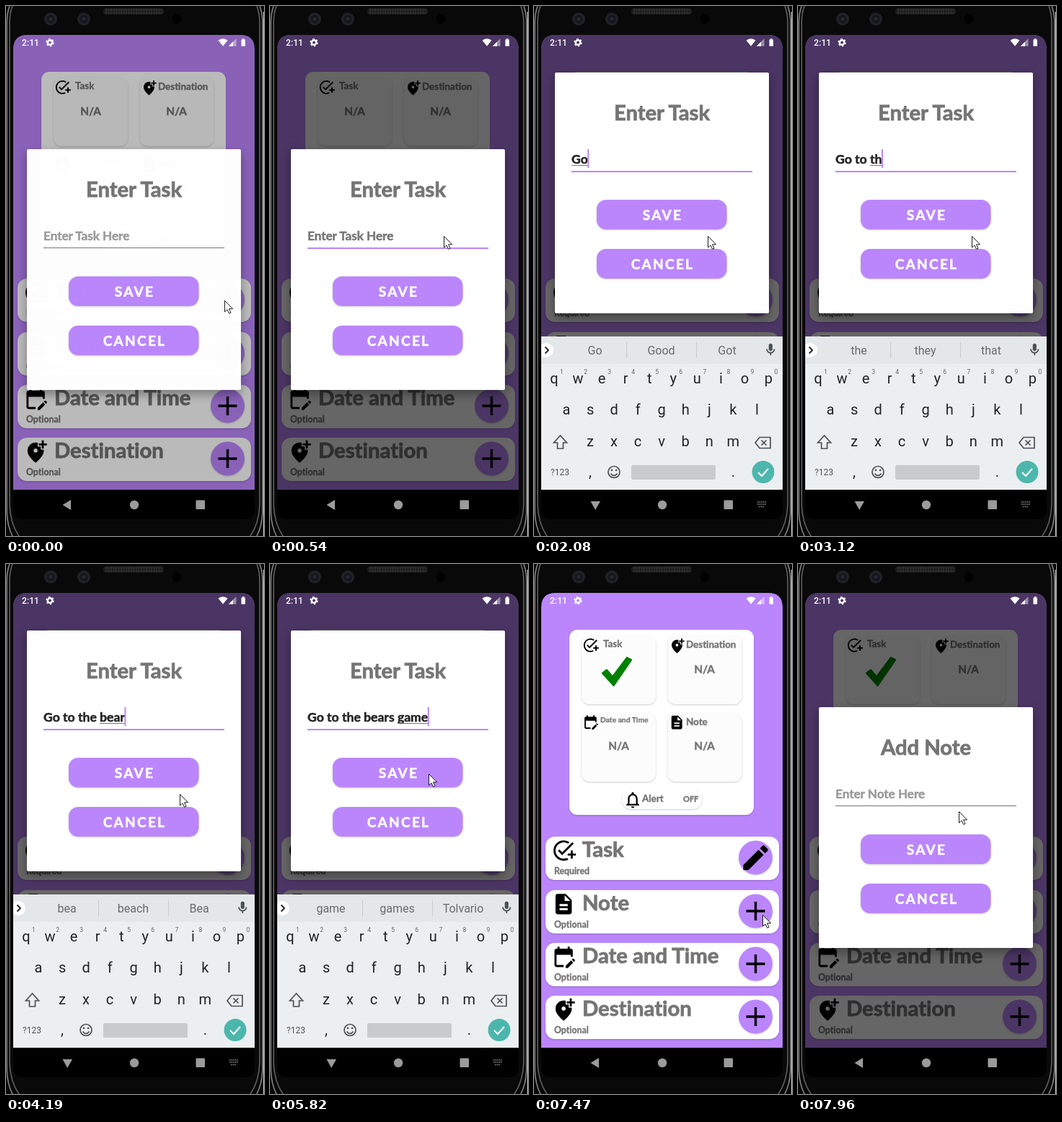
Recreate the animation shown at these times as an HTML page. Size 358 by 733 pixels, loop 8 s.

```html
<!DOCTYPE html>
<html lang="en">
<head>
<meta charset="utf-8">
<title>Task planner</title>
<style>
html, body { margin: 0; width: 100%; height: 100%; overflow: hidden; background: #000; }
svg { display: block; width: 358px; height: 733px; font-family: Lato, "Open Sans", sans-serif; font-weight: 700; }
text { fill: currentColor; stroke: currentColor; stroke-width: .028em; font-variant-ligatures: none; }
.robo { font-family: Roboto, sans-serif; font-weight: 400; }
.robo text, text.robo { stroke: none; }
.mid { text-anchor: middle; }
.lift { filter: drop-shadow(0 1px 1px rgba(0,0,0,.2)); }
.float { filter: drop-shadow(0 6px 7px rgba(0,0,0,.35)); }
.line { fill: none; stroke: #4a5053; stroke-width: 1.7; }
</style>
</head>
<body>
<svg id="stage" viewBox="0 0 358 733"></svg>
<script>
const LOOP = 8000, PURPLE = '#bb86fc', GREY = '#757575';
const icons = {
  task: 'M22 5.18L10.59 16.6l-4.24-4.24 1.41-1.41 2.83 2.83 10-10L22 5.18zM12 20c-4.41 0-8-3.59-8-8s3.59-8 8-8c1.57 0 3.04.46 4.28 1.25l1.45-1.45C16.1 2.67 14.13 2 12 2 6.48 2 2 6.48 2 12s4.48 10 10 10c1.73 0 3.36-.44 4.78-1.22l-1.5-1.5c-1 .46-2.11.72-3.28.72zm7-5h-3v2h3v3h2v-3h3v-2h-3v-3h-2v3z',
  note: 'M14 2H6c-1.1 0-2 .9-2 2v16c0 1.1.9 2 2 2h12c1.1 0 2-.9 2-2V8l-6-6zm2 16H8v-2h8v2zm0-4H8v-2h8v2zm-3-5V3.5L18.5 9H13z',
  date: 'M12 22H5c-1.11 0-2-.9-2-2L3.01 6c0-1.1.88-2 1.99-2h1V2h2v2h8V2h2v2h1c1.1 0 2 .9 2 2v6h-2v-2H5v10h7v2zm10.13-5.01l.71-.71c.39-.39.39-1.02 0-1.41l-.71-.71c-.39-.39-1.02-.39-1.41 0l-.71.71 2.12 2.12zm-.71.71l-5.3 5.3H14v-2.12l5.3-5.3 2.12 2.12z',
  place: 'M20 1v3h3v2h-3v3h-2V6h-3V4h3V1h2zm-8 12c1.1 0 2-.9 2-2s-.9-2-2-2-2 .9-2 2 .9 2 2 2zm2-9.75V7h3v3h2.92c.05.39.08.79.08 1.2 0 3.32-2.67 7.25-8 11.8-5.33-4.55-8-8.48-8-11.8C4 6.22 7.8 3 12 3c.68 0 1.35.08 2 .25z',
  bell: 'M12 22c1.1 0 2-.9 2-2h-4c0 1.1.9 2 2 2zm6-6v-5c0-3.07-1.63-5.64-4.5-6.32V4c0-.83-.67-1.5-1.5-1.5s-1.5.67-1.5 1.5v.68C7.64 5.36 6 7.92 6 11v5l-2 2v1h16v-1l-2-2zm-2 1H8v-6c0-2.48 1.51-4.5 4-4.5s4 2.02 4 4.5v6z',
  pen: 'M3 17.25V21h3.75L17.81 9.94l-3.75-3.75L3 17.25zM20.71 7.04c.39-.39.39-1.02 0-1.41l-2.34-2.34c-.39-.39-1.02-.39-1.41 0l-1.83 1.83 3.75 3.75 1.83-1.83z',
  mic: 'M12 14c1.66 0 3-1.34 3-3V5c0-1.66-1.34-3-3-3S9 3.34 9 5v6c0 1.66 1.34 3 3 3zm5-3c0 2.76-2.24 5-5 5s-5-2.24-5-5H5c0 3.53 2.61 6.43 6 6.92V21h2v-3.08c3.39-.49 6-3.39 6-6.92h-2z'
};

// Markup helpers
const rect = (x, y, w, h, r, fill, more = '') =>
  `<rect x="${x}" y="${y}" width="${w}" height="${h}" rx="${r}" fill="${fill}" ${more}/>`;
const circle = (x, y, r, fill, more = '') => `<circle cx="${x}" cy="${y}" r="${r}" fill="${fill}" ${more}/>`;
const path = (d, fill, more = '') => `<path d="${d}" fill="${fill}" ${more}/>`;
const text = (x, y, size, str, color = GREY, more = '') =>
  `<text x="${x}" y="${y}" font-size="${size}" color="${color}" ${more}>${str}</text>`;
const mid = (x, y, size, str, color, more = '') => text(x, y, size, str, color, `class="mid" ${more}`);
const icon = (name, x, y, k, fill = '#000') =>
  path(icons[name], fill, `transform="translate(${x} ${y}) scale(${k})"`);
const group = (id, inner, more = '') => `<g id="${id}" ${more}>${inner}</g>`;

function phone() {
  const cam = x => circle(x, 18, 9, '#202226') + circle(x, 18, 5.5, '#14161b') + circle(x, 18, 2.5, '#23283a');
  const edge = (d, color) => path(d, 'none', `stroke="${color}" stroke-width="1.5"`);
  return rect(0, 0, 358, 733, 0, '#090909')
    + edge('M9 0Q5 10 5 24V690Q6 716 18 733M348 0Q352 10 352 24V690Q351 716 339 733', '#666')
    + edge('M5 0Q1.2 10 1.2 24V700Q2 720 9 733M352 0Q356 10 356 24V700Q355 720 348 733', '#8a8a8a')
    + path('M357.6 8V733', 'none', 'stroke="#e4e4e4"')
    + cam(62) + cam(108) + circle(237, 18, 6.5, '#000')
    + rect(135, 3, 84, 9, 4, '#1d1d1d')
    + path('M138 5.5H216M138 9.5H216', 'none', 'stroke="#383838" stroke-width="2" stroke-dasharray="2 1.5"')
    + path('M10 669H345V695Q345 710 330 710H25Q10 710 10 695Z', '#000');
}

function summary() {
  const cell = (x, y) => rect(x, y, 103, 95, 11, '#fcfcfc', 'class="lift"');
  return rect(49, 91, 256, 256, 11, '#fff', 'class="lift"')
    + cell(66, 99) + cell(185.5, 99) + cell(66, 206) + cell(185.5, 206)
    + icon('task', 67, 101, .95) + text(96, 115, 13.4, 'Task')
    + icon('place', 187.3, 102, .93) + text(211, 116, 13.4, 'Destination')
    + icon('date', 67.3, 207.5, .93) + text(92, 219, 10.3, 'Date and Time')
    + icon('note', 187, 208, .93) + text(211, 223, 13.4, 'Note')
    + mid(236.5, 151, 15.3, 'N/A', GREY) + mid(117.5, 257, 15.3, 'N/A', GREY) + mid(236.5, 257, 15.3, 'N/A', GREY)
    + group('todo', mid(117.5, 151, 15.3, 'N/A', GREY))
    + group('done', path('M95 151L101 146.5L109 156L129 129.5L135 132.5L110.5 168Z', 'green',
      'stroke="green" stroke-width="2.4" stroke-linejoin="round"'))
    + rect(122, 311, 111, 28, 13, '#fff', 'class="lift"')
    + icon('bell', 123.6, 312.8, 1.12) + text(150, 329, 13.4, 'Alert') + text(207, 329, 11, 'OFF');
}

function row(y, glyph, title, note) {
  const plus = path(`M294.5 ${y + 29}h26m-13 -13v26`, 'none', 'stroke="#000" stroke-width="3.4"');
  const mark = glyph === 'task'
    ? group('add', plus) + group('edit', icon('pen', 284.8, y + 6.4, 1.9)) : plus;
  return rect(16, y, 324, 60, 13, '#fff', 'class="lift"')
    + icon(glyph, 24.2, y + 2.4, 1.41)
    + text(67, y + 28, 29.3, title) + text(28, y + 52, 12.3, note)
    + circle(307.5, y + 29, 23.5, PURPLE, 'class="lift"') + mark;
}

function dialog() {
  const button = (y, label) => rect(87, y, 180.5, 41, 13, PURPLE, 'class="lift"')
    + mid(178.5, y + 28, 19, label, '#fff', 'letter-spacing="2.3"');
  return rect(29, 0, 297, 333, 2, '#fff', 'class="float"')
    + mid(177.5, 66, 29.2, '', GREY, 'id="title"')
    + text(52, 126, 17.1, '', GREY, 'id="hint"')
    + text(52, 126, 17.6, '', '#222', 'id="entry"')
    + rect(0, 128, 0, 1, 0, '#777', 'id="mark"')
    + rect(52, 106, 2, 26, 0, PURPLE, 'id="caret"')
    + rect(52, 136, 251, 1, 0, GREY, 'id="rule"')
    + button(176, 'SAVE') + button(244, 'CANCEL');
}

function keyboard() {
  const ink = '#202427';
  const keys = (str, x, y) => [...str].map((c, i) => mid(x + 33.05 * i, y, 20, c, ink, 'data-key')).join('');
  const digits = [...'1234567890'].map((c, i) => mid(38.5 + 33.05 * i, 509, 8.5, c, '#5f6569')).join('');
  const words = [84.5, 176.5, 268].map(x => mid(x, 482, 16, '', '#656b6f', 'data-word')).join('');
  return rect(10, 457, 335, 212, 0, '#eceff1') + rect(10, 457, 335, 38, 0, '#e4e7e9')
    + circle(17, 476, 10, '#fff') + path('M15.5 471.5l4.5 4.5-4.5 4.5', 'none', 'stroke="#222" stroke-width="1.8"')
    + group('split', path('M128.5 465V487M225.5 465V487', 'none', 'stroke="#c5cacd"')) + words
    + icon('mic', 318, 465, .86, '#4a5053')
    + keys('qwertyuiop', 28, 522) + digits + keys('asdfghjkl', 45, 565) + keys('zxcvbnm', 78, 609)
    + '<path id="shift" class="line" d="M36.5 594L27.5 604H32.5V612H40.5V604H45.5Z"/>'
    + '<path class="line" d="M313 596.5H328V611.5H313L307 604ZM315.5 600.5l7 7m0-7l-7 7"/>'
    + mid(36, 649, 12, '?123', '#4a5053') + mid(78, 651, 20, ',', ink) + mid(276.5, 651, 20, '.', ink)
    + '<circle class="line" cx="111" cy="644.5" r="8"/><path class="line" d="M106.5 646.5Q111 652.5 115.5 646.5"/>'
    + circle(108, 642, 1.3, '#4a5053') + circle(114, 642, 1.3, '#4a5053')
    + rect(135, 635, 117, 20, 2, '#c7cbce')
    + circle(318, 644.5, 15.5, '#4db6ac')
    + path('M311 645l5 5 9-10', 'none', 'stroke="#fff" stroke-width="2"');
}

function status() {
  return text(22, 55, 12.2, '2:11', '#fff', 'class="robo" style="font-weight:500"')
    + circle(61, 50.5, 3.2, 'none', 'stroke="#fff" stroke-width="2.4"')
    + circle(61, 50.5, 4.9, 'none', 'stroke="#fff" stroke-width="1.6" stroke-dasharray="2.5 2.63"')
    + path('M294.5 47.5Q301 43 307.5 47.5L301 55.5Z', '#fff')
    + path('M309 55.5L319.5 45V55.5Z', '#fff', 'opacity=".45"') + path('M309 55.5L315 49.5V55.5Z', '#fff')
    + path('M326.5 46.5h1.5v-1.5h2.5v1.5h1.5v9h-5.5z', '#fff');
}

function nav() {
  const c = '#9b9b9b';
  return circle(178, 690, 6.2, c) + rect(263.5, 683.5, 12.5, 12.5, 1, c)
    + group('back', path('M90 683V697L78.5 690Z', c))
    + group('hide', path('M78.5 685H92L85.2 697Z', c)
      + path('M310 686H322M310 689H322M312 692.5H320', 'none', 'stroke="#8a8a8a" stroke-width="1.6" stroke-dasharray="1.6 1"'));
}

const stage = document.getElementById('stage');
stage.innerHTML = `<defs><clipPath id="screen"><path d="M10 669V60Q10 40 30 40H325Q345 40 345 60V669Z"/></clipPath></defs>`
  + phone()
  + `<g clip-path="url(#screen)">`
  + rect(10, 40, 335, 629, 0, PURPLE) + summary()
  + row(377, 'task', 'Task', 'Required') + row(451, 'note', 'Note', 'Optional')
  + row(524, 'date', 'Date and Time', 'Optional') + row(597, 'place', 'Destination', 'Optional')
  + rect(10, 40, 335, 629, 0, '#000', 'id="scrim"')
  + group('dialog', dialog())
  + group('pad', rect(10, 457, 335, 212, 0, '#000') + group('keys', keyboard(), 'class="robo"'))
  + status() + `</g>` + nav()
  + group('mouse', path('M.5 .5V16L4 12.8L6.6 18.3L9 17.2L6.5 11.8H11.6Z', '#fff', 'stroke="#1c1c1c"'));

const el = {};
stage.querySelectorAll('[id]').forEach(n => el[n.id] = n);
const letters = stage.querySelectorAll('[data-key]');
const words = stage.querySelectorAll('[data-word]');

const ticks = [0, 120, 240, 390, 540, 660, 780, 900, 1040, 1180, 1710, 1830, 2080, 2490, 2610, 2730, 2850,
  3000, 3120, 3270, 3640, 3790, 3910, 4040, 4190, 4310, 4460, 4610, 4730, 5320, 5570, 5700, 5820,
  6230, 6350, 6470, 6590, 6710, 6830, 6950, 7100, 7220, 7470, 7720, 7840, 7960];

// Time, characters typed, suggestions
const phrase = 'Go to the bears game';
const typing = [
  [1710, 1, ''], [1830, 1, 'G I Good'], [2080, 2, 'Go Good Got'], [2490, 3, 'to ahead for'],
  [2610, 4, 'to the time'], [2730, 5, 'to too top'], [2850, 6, 'the be get'], [3000, 7, 'the to this'],
  [3120, 8, 'the they that'], [3270, 9, 'the then they'], [3640, 10, 'store gym same'], [3790, 11, 'be bank best'],
  [3910, 12, 'be best beach'], [4040, 13, 'bea beach Bea'], [4190, 14, 'bea beach Bea'], [4310, 16, 'bears bear beard'],
  [4460, 17, 'game and in'], [4610, 19, 'game games Game'], [4730, 20, 'game games Tolvario']
];

const shades = [[0, .27], [240, .6], [6200, .6], [6350, .45], [6700, 0], [7470, 0], [7720, .27], [7960, .6]];
const solid = [[0, .99], [120, 1], [6200, 1], [6350, .26], [6430, 0], [7600, 0], [7720, .99], [7840, 1]];
const padFade = [[6200, 1], [6350, .57], [6590, 0]];
const mouseX = [[0, 303], [240, 256], [390, 241], [5450, 241], [5820, 220], [6350, 220], [6950, 333], [7220, 317], [7600, 317], [7960, 223]];
const mouseY = [[0, 407], [240, 335], [390, 318], [5450, 318], [5820, 290], [6350, 290], [6950, 485], [7100, 480], [7220, 486], [7470, 485], [7600, 485], [7960, 342]];

function track(t, pts) {
  const i = pts.findIndex(p => p[0] > t);
  if (i < 0) return pts[pts.length - 1][1];
  if (i === 0) return pts[0][1];
  const [a, u] = pts[i - 1], [b, v] = pts[i];
  return u + (v - u) * (t - a) / (b - a);
}
const easeOut = (t, a, b) => 1 - Math.pow(1 - Math.min(1, Math.max(0, (t - a) / (b - a))), 3);
const show = (node, on) => node.setAttribute('display', on ? 'inline' : 'none');
const set = (node, str) => { if (node.textContent !== str) node.textContent = str; };
const move = (node, x, y) => node.setAttribute('transform', `translate(${x} ${y})`);

function drawField(t, focus, second) {
  const step = typing.filter(s => s[0] <= t).pop();
  const typed = step && !second ? phrase.slice(0, step[1]) : '';
  set(el.title, second ? 'Add Note' : 'Enter Task');
  set(el.hint, typed ? '' : second ? 'Enter Note Here' : 'Enter Task Here');
  el.hint.setAttribute('color', focus ? GREY : '#9a9a9a');
  set(el.entry, typed.replace(/ /g, '\u00a0'));

  const width = typed ? el.entry.getComputedTextLength() : 0;
  const start = typed.lastIndexOf(' ') + 1;
  const open = start < typed.length;
  show(el.mark, open);
  if (open) {
    const x = el.entry.getStartPositionOfChar(start).x;
    el.mark.setAttribute('x', x);
    el.mark.setAttribute('width', 52 + width - x);
  }
  el.caret.setAttribute('x', 52 + width - (typed ? .5 : 0));
  show(el.caret, focus && t >= 660 && !(t >= 5320 && t < 5570));
  el.rule.setAttribute('fill', focus ? PURPLE : GREY);
  el.rule.setAttribute('height', focus ? 2 : 1);

  const offers = step ? step[2].split(' ') : [];
  words.forEach((w, i) => set(w, offers[i] || ''));
  show(el.split, offers.length > 1);
  const upper = t < 1830;
  letters.forEach(k => set(k, upper ? k.textContent.toUpperCase() : k.textContent.toLowerCase()));
  el.shift.style.fill = upper ? '#4a5053' : 'none';
}

function draw(now) {
  const t = ticks.filter(k => k <= now).pop();
  const second = t >= 7000, saved = t >= 6230;
  const focus = t >= 540 && !second;

  drawField(t, focus, second);
  show(el.todo, !saved);
  show(el.add, !saved);
  show(el.done, saved);
  show(el.edit, saved);

  el.scrim.setAttribute('opacity', track(t, shades));
  const alpha = track(t, solid);
  el.dialog.setAttribute('opacity', alpha);
  show(el.dialog, alpha > 0);
  move(el.dialog, 0, second ? 198 : 198 - 106 * easeOut(t, 700, 1180));

  const typingMode = t >= 660 && t < 6590;
  show(el.pad, typingMode);
  move(el.pad, 0, 212 * (1 - easeOut(t, 600, 1040)));
  el.keys.setAttribute('opacity', track(t, padFade));
  show(el.back, !typingMode);
  show(el.hide, typingMode);

  move(el.mouse, track(t, mouseX), track(t, mouseY));
}

const begin = performance.now();
function loop() {
  draw((performance.now() - begin) % LOOP);
  requestAnimationFrame(loop);
}
loop();
</script>
</body>
</html>
```
